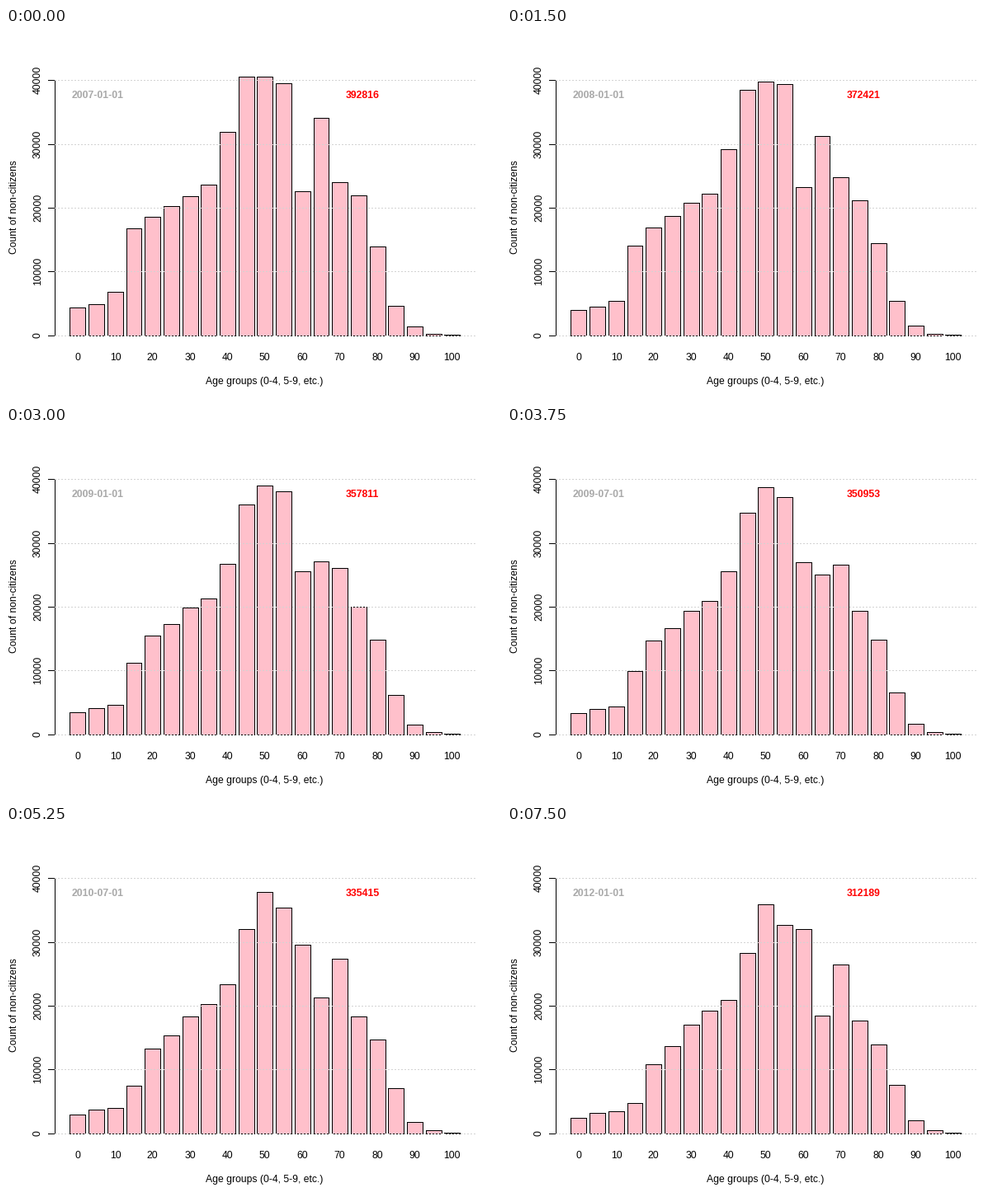
These frames come from a looping animation (600x450 px, 8000 ms). A matplotlib script:

```python
import numpy as np
import matplotlib.pyplot as plt
from matplotlib.animation import FuncAnimation
from matplotlib.patches import Rectangle

W, H, DPI = 600, 450, 100
PX = 72 / DPI                    # one pixel in points
LEFT, RIGHT, ZERO = 59, 569, 373  # plot edges and the zero line
UNIT = 18.916                    # width of a bar; gaps are a fifth of it
STEP_MS, LOOP_MS, TICK_MS = 750, 8000, 250

# Starting age profile in pixels per five-year group, led by the unborn
PROFILE = np.array([26, 34, 38, 53, 130, 144, 157, 169, 183, 247, 314, 314,
                    306, 175, 264, 186, 170, 108, 36, 11, 2, 1])
GROUPS = len(PROFILE) - 1
# Yearly loss per group: naturalisation peaks when young, deaths when old
LOSS = np.interp(np.arange(GROUPS),
                 [1, 3, 4, 6, 7, 10, 11, 13, 15, 17, 19],
                 [.06, .07, .087, .035, .025, .024, .043, .041, .061, .121, .2])
TOTAL_YEARS = [0, 0.5, 1, 2, 3, 4, 5]
TOTALS = [392816, 381106, 372421, 357811, 344095, 326735, 312189]

# Smooth cumulative profile: its slope at every boundary between groups
padded = np.pad(PROFILE, 2, mode="edge")
slope = (7 * (padded[1:-2] + padded[2:-1]) - padded[:-3] - padded[3:]) / 12
below = np.concatenate([[0], np.cumsum(PROFILE)])


def younger_than(x):
    """People below boundary x, measured in groups."""
    k = np.clip(np.floor(x).astype(int), 0, GROUPS)
    s, m, a, b = x - k, PROFILE[k], slope[k], slope[k + 1]
    return below[k] + s * (a + s * (3 * m - 2 * a - b + s * (a + b - 2 * m)))


def bar_heights(years):
    """Everyone grows older while each group shrinks at its own rate."""
    edges = np.arange(1, GROUPS + 2) - years / 5
    people = np.diff(younger_than(edges)) * np.exp(-LOSS * years)
    return np.maximum(1, np.round(people))


plt.rcParams.update({"font.family": "Liberation Sans",
                     "font.size": 12.1 * PX})
fig = plt.figure(figsize=(W / DPI, H / DPI), dpi=DPI, facecolor="white")
ax = fig.add_axes([0, 0, 1, 1])
ax.set(xlim=(0, W), ylim=(H, 0))
ax.axis("off")


def block(x, y, w, h, color, z):
    ax.add_patch(Rectangle((x, y), w, h, fc=color, ec="none", lw=0,
                           antialiased=False, zorder=z))


def label(x, y, s, **kw):
    return ax.text(x, y, s, va="baseline", rotation_mode="anchor", **kw)


bars = []
for i in range(GROUPS):
    x = 59.04 + UNIT * (1 + 1.2 * i)
    x0, x1 = int(x), int(x + UNIT)
    bar = Rectangle((x0, ZERO), x1 - x0, 0, fc="pink", ec="black", lw=PX,
                    joinstyle="miter", antialiased=False, zorder=2)
    bars.append(ax.add_patch(bar))
    if i % 2 == 0:
        label((x0 + x1) / 2, 403, str(5 * i), ha="center")

block(LEFT, 63, 1, ZERO - 62, "black", 3)
for value in range(0, 50000, 10000):
    y = int(373.42 - value * 314.38 / 40600)
    block(51, y, 8, 1, "black", 3)
    for x in range(LEFT, RIGHT, 4):
        block(x, y, 2, 1, "lightgray", 4)
    label(42, y - 0.5, str(value), ha="center", rotation=90)

label(313.5, 432, "Age groups (0-4, 5-9, etc.)", ha="center")
label(13, 217, "Count of non-citizens", ha="center", rotation=90)
bold = dict(weight="bold", size=12.25 * PX)
date_text = label(80, 85, "", color="darkgray", **bold)
total_text = label(412, 85, "", color="red", **bold)


def update(n):
    half = n * TICK_MS // STEP_MS
    years = half / 2
    for bar, h in zip(bars, bar_heights(years)):
        bar.set_y(ZERO - h)
        bar.set_height(h)
    date_text.set_text(f"{2007 + half // 2}-{'07' if half % 2 else '01'}-01")
    total_text.set_text(f"{np.interp(years, TOTAL_YEARS, TOTALS):.0f}")
    return [*bars, date_text, total_text]


anim = FuncAnimation(fig, update, frames=LOOP_MS // TICK_MS,
                     interval=TICK_MS, repeat=True, repeat_delay=0)
plt.show()
```
